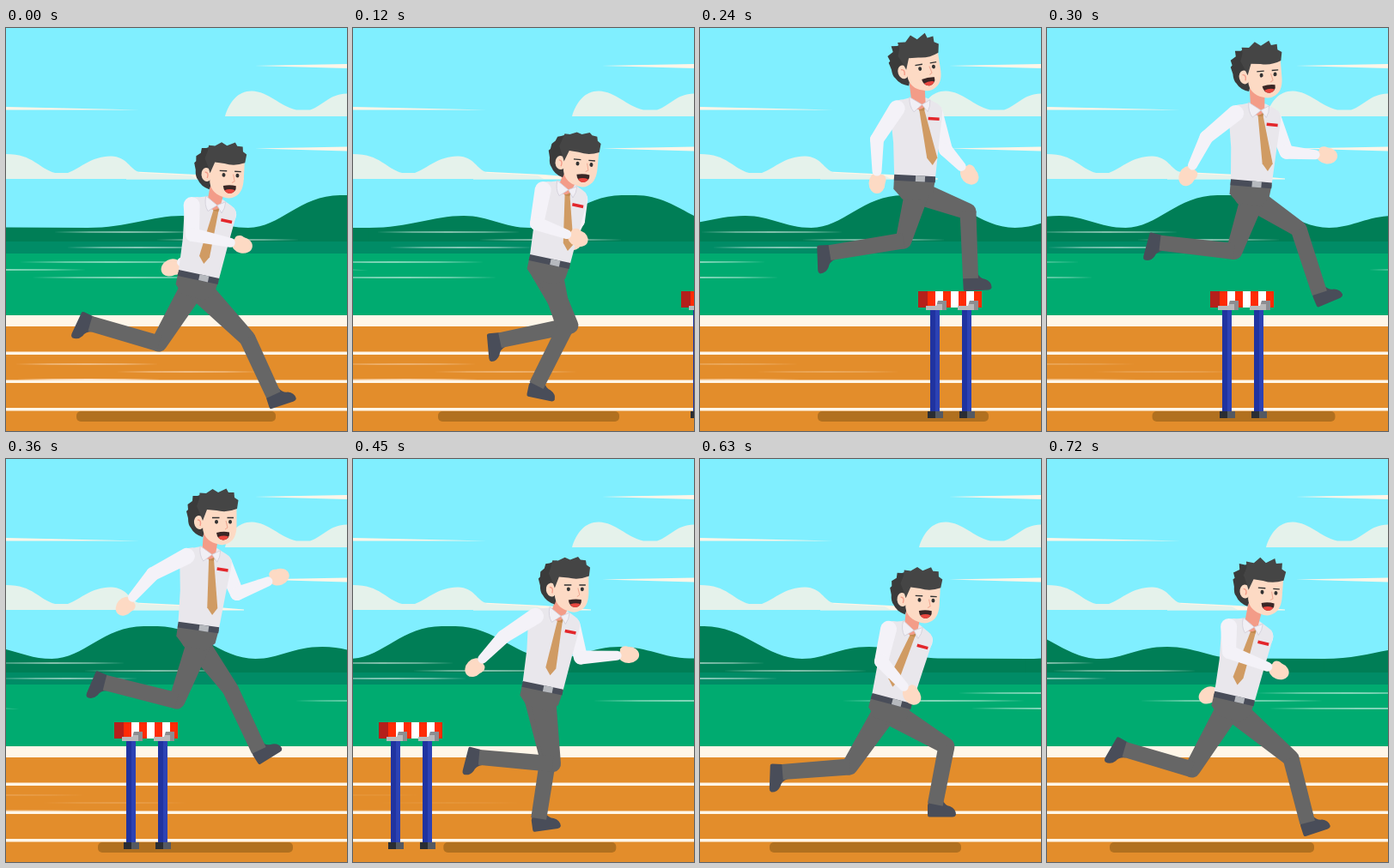
Write an HTML page with a canvas that moves like this. It is 397 by 470 pixels and loops after 0.75 s.

```html
<!DOCTYPE html>
<html lang="en">
<head>
<meta charset="utf-8">
<title>Hurdle run</title>
<style>
  html, body { margin: 0; width: 100%; height: 100%; overflow: hidden; background: #80efff; }
  canvas { display: block; width: 397px; height: 470px; }
</style>
</head>
<body>
<canvas id="stage" width="397" height="470"></canvas>
<script>
const ctx = document.getElementById('stage').getContext('2d');
const W = 397, LOOP = 750, STEP = 30, DEG = Math.PI / 180;
const CREAM = '#fff6e8', CLOUD = '#e5f2eb', SKIN = '#fddac4', PINK = '#f39c88';
const SHIRT = '#e9e7ec', SLEEVE = '#f4f2f8', PANTS = '#666666', SHOE = '#494d59';

// Pose times and tracks, one row per pose
const TIMES = [0, 120, 240, 360, 510, 630, 720];
// x, y, lean, tie sway
const BODY = [[224, 290, 12, 2], [229, 272, 12, 17], [250, 175, 3, 19], [224, 196, 8, 13],
  [220, 299, 13.5, 0], [223, 282, 15, -4], [218, 279, 13, -1]];
// x, y, tilt, hair lift
const HEAD = [[261.5, 171.5, 3, .4], [269.5, 158.5, 5, 0], [264, 46, -9, 1], [253, 73, 0, .5],
  [262.5, 186.5, 0, .1], [263.5, 164.5, 3, .5], [258.5, 155.5, 4, 1]];
// knee, ankle, toe angle
const LEG_A = [[281, 362, 311, 427, -18], [247, 350, 214, 416, 12], [237, 248, 152, 262, 88],
  [199, 282, 116, 261, 113], [261, 376, 177, 387, 92], [287, 335, 274, 402, 0], [284, 349, 303, 423, -18]];
const LEG_B = [[178, 368, 99, 345, 115], [253, 347, 172, 364, 85], [312, 214, 315, 291, -3],
  [261, 268, 294, 339, -32], [206, 382, 164, 431, 20], [174, 359, 97, 365, 92], [169, 362, 91, 339, 120]];
// elbow, hand
const ARM_NEAR = [[217, 241, 274, 253], [214, 228, 261, 245], [206, 130, 206, 180],
  [171, 134, 139, 171], [181, 243, 147, 278], [211, 236, 246, 275], [212, 225, 269, 247]];
const ARM_FAR = [[240, 255, 193, 279], [262, 225, 258, 246], [286, 142, 313, 171],
  [269, 157, 317, 138], [260, 266, 312, 287], [246, 250, 225, 268], [235, 250, 189, 275]];
// left, right
const SHADOW = [[82, 314], [99, 310], [137, 336], [107, 334], [104, 292], [81, 304], [73, 311]];

const HIP_A = [4, 14], HIP_B = [-4, 14], SHOULDER_NEAR = [-25, -80], SHOULDER_FAR = [19, -78];

// Point of a rotated frame [x, y, degrees]
function place([x, y, deg], [px, py]) {
  const c = Math.cos(deg * DEG), s = Math.sin(deg * DEG);
  return [x + px * c - py * s, y + px * s + py * c];
}

function bone(a, b) {
  let ang = Math.atan2(b[1] - a[1], b[0] - a[0]) / DEG;
  if (ang < -90) ang += 360;
  return [ang, Math.hypot(b[0] - a[0], b[1] - a[1])];
}

// Two-bone chains are interpolated as angles and lengths
const chain = (rows, root) => rows.map(([kx, ky, ex, ey, ...rest], i) =>
  [...bone(place(BODY[i], root), [kx, ky]), ...bone([kx, ky], [ex, ey]), ...rest]);
const legA = chain(LEG_A, HIP_A), legB = chain(LEG_B, HIP_B);
const armNear = chain(ARM_NEAR, SHOULDER_NEAR), armFar = chain(ARM_FAR, SHOULDER_FAR);

// Periodic monotone cubic interpolation
function sample(rows, t) {
  const n = TIMES.length;
  let i = n - 1;
  while (TIMES[i] > t) i--;
  const row = j => rows[(j + n) % n];
  const time = j => TIMES[(j + n) % n] + LOOP * Math.floor(j / n);
  const slope = (j, c) => (row(j + 1)[c] - row(j)[c]) / (time(j + 1) - time(j));
  const tangent = (j, c) => {
    const a = slope(j - 1, c), b = slope(j, c);
    return a * b <= 0 ? 0 : 2 * a * b / (a + b);
  };
  const h = time(i + 1) - time(i), u = (t - time(i)) / h, v = 1 - u;
  return row(i).map((p, c) =>
    p * (1 + 2 * u) * v * v + row(i + 1)[c] * (3 - 2 * u) * u * u +
    h * (tangent(i, c) * u * v * v - tangent(i + 1, c) * u * u * v));
}

function fill(color, d) {
  ctx.fillStyle = color;
  ctx.fill(new Path2D(d));
}

function line(color, width, d) {
  ctx.strokeStyle = color;
  ctx.lineWidth = width;
  ctx.stroke(new Path2D(d));
}

function rect(color, x, y, w, h) {
  ctx.fillStyle = color;
  ctx.fillRect(x, y, w, h);
}

function oval(color, x, y, rx, ry, rot = 0) {
  ctx.fillStyle = color;
  ctx.beginPath();
  ctx.ellipse(x, y, rx, ry, rot, 0, 7);
  ctx.fill();
}

function within([x, y, deg], draw) {
  ctx.save();
  ctx.translate(x, y);
  ctx.rotate(deg * DEG);
  draw();
  ctx.restore();
}

// Tapered limb segment with rounded ends
function limb(color, a, b, ra, rb) {
  const ang = Math.atan2(b[1] - a[1], b[0] - a[0]), q = Math.PI / 2;
  ctx.fillStyle = color;
  ctx.beginPath();
  ctx.arc(a[0], a[1], ra, ang + q, ang - q);
  ctx.arc(b[0], b[1], rb, ang - q, ang + q);
  ctx.fill();
}

function streak(x, y, len, color) {
  const m = x + len / 2;
  fill(color, `M${x} ${y}Q${m} ${y - 2} ${x + len} ${y}Q${m} ${y + 2} ${x} ${y}`);
}

function sky() {
  rect('#80efff', 0, 0, W, 260);
  fill(CREAM, 'M0 92L155 95.5L0 95.5ZM290 44L397 42V47ZM290 140.500L397 138.500V143.500Z');
  fill(CREAM, 'M140 167L222 171L277 175.500L277 176.500H140Z');
  fill(CLOUD, 'M255 103C260 86 270 73.500 286 73.500C306 74 318 91 338 95.500H354C370 90 376 77 397 76.500V103Z');
  fill(CLOUD, 'M0 147C32 147 38 164 57 169H72C88 163 98 150 122 149.500C142 150 143 165 157 169L215 172L222 176H0Z');
}

function field(t) {
  const shift = 0.635 * t, tile = 685;
  for (const k of [-1, 0, 1]) {
    ctx.save();
    ctx.translate(397 + k * tile - shift, 0);
    fill('#007e56', 'M-302 250V233C-255 233 -228 219 -192 219C-162 219 -146 233 -115 233' +
      'C-78 233 -55 195 -8 195H8C55 195 80 233 122 233C150 233 165 219 200 219' +
      'C232 219 250 232 280 232.500L384 233V250Z');
    ctx.restore();
  }
  rect('#008c66', 0, 249, W, 14);
  rect('#00ab70', 0, 263, W, 73);
  const pale = 'rgba(255,255,255,.5)';
  [[55, 238], [174, 247], [70, 256]].forEach(([x, y]) => streak(x - t * 7 / 30, y, 168, pale));
  [[15, 273], [-120, 282], [30, 291]].forEach(([x, y]) => {
    streak(x - shift, y, 214, pale);
    streak(x + tile - shift, y, 214, pale);
  });
}

function track(t) {
  rect('#e38d2b', 0, 340, W, 130);
  rect(CREAM, 0, 335, W, 13);
  [377.5, 410.5, 443].forEach(y => rect(CREAM, 0, y, W, 3.5));
  const slide = 0.31 * t - 0.0002 * t * t, fade = Math.max(0, 1 - t / 530);
  [[10, 392, .5], [128, 401, .5], [12, 410, .9]].forEach(([x, y, a]) =>
    streak(x - slide, y, 168, `rgba(255,235,215,${a * fade})`));
}

function hurdle(t) {
  ctx.save();
  ctx.translate(510 - t * 16 / 15, 0);
  for (const x of [14, 51]) {
    rect('#2033a0', x, 322, 6, 126);
    rect('#2c42b4', x + 6, 322, 5, 126);
    rect('#2a2d33', x - 3, 447, 9, 8);
    rect('#545962', x + 6, 447, 9, 8);
  }
  rect('#b5201b', 0, 307, 11, 19);
  for (let i = 0; i < 7; i++) rect(i % 2 ? '#ffffff' : '#ff2b06', 11 + i * 9, 307, 9, 19);
  for (const x of [9, 46]) {
    fill('#b9b9bb', `M${x} 324H${x + 12}L${x + 14} 318H${x + 24}V329H${x}Z`);
    fill('#8d8d91', `M${x + 14} 318H${x + 24}V329H${x + 19}V322H${x + 13}Z`);
  }
  ctx.restore();
}

function shadow(t) {
  const [l, r] = sample(SHADOW, t);
  ctx.fillStyle = '#b1701f';
  ctx.beginPath();
  ctx.roundRect(l, 447, r - l, 12, 5);
  ctx.fill();
}

function joints(body, root, [a1, l1, a2, l2]) {
  const top = place(body, root);
  const mid = place([...top, a1], [l1, 0]);
  return [top, mid, place([...mid, a2], [l2, 0])];
}

function leg(body, root, pose) {
  const [hip, knee, ankle] = joints(body, root, pose);
  within([...ankle, pose[4]], () =>
    fill(SHOE, 'M-9 13V2Q-8 -5 0 -6L8 -5Q11 2 17 3Q24 6 24 13Q23 15.500 20 15.500H-7Q-9 15.500 -9 13Z'));
  limb(PANTS, hip, knee, 14.5, 9.5);
  // trouser leg has a square hem
  const d = pose[2], len = pose[3];
  within([...knee, d], () => fill(PANTS, `M0 -9.500L${len + 1} -9V9L0 9.500Z`));
}

function arm(body, root, pose) {
  const [top, elbow, hand] = joints(body, root, pose);
  within([...hand, pose[2]], () => {
    oval(SKIN, 1, 0, 12, 9.5);
    oval(SKIN, -3, -6, 6, 4.5);
  });
  const wrist = place([...elbow, pose[2]], [Math.max(4, pose[3] - 13), 0]);
  limb(SLEEVE, top, elbow, 9.5, 8);
  limb(SLEEVE, elbow, wrist, 8, 5.5);
}

function torso(sway) {
  fill(PANTS, 'M-24 0H24L22 16L12 26L-14 24L-24 14Z');
  fill(SHIRT, 'M-24 -2L-27 -40L-33 -78Q-31 -90 -18 -91L-9 -94H9L20 -89Q29 -86 28 -75L26 -42L24 -2Z');
  rect(SHOE, -24, -3, 48, 7);
  rect('#b6b9be', 1, -3, 11, 7);
  const s = sway;
  fill('#d09b63', `M1 -80H7L${s + 6} -25L${s + 1} -16L${s - 6} -24Z`);
  fill('#c28a50', 'M0 -86L4 -89L8 -86L7 -79H1Z');
  rect('#e3262b', 12, -72, 13, 3.5);
}

function collar() {
  const d = 'M-11 -94L4 -86L-5 -77Q-11 -83 -11 -94ZM13 -92L4 -86L11 -78Q14 -84 13 -92Z';
  fill('#f1eff5', d);
  line('#d2cfd9', .8, d);
}

function head(k) {
  fill('#3b3b3b', `M-18 -14L-22 -33L-30 -30L${-34 - 3 * k} ${-29 - 2 * k}L-36 -24L${-40 - 3 * k} -20` +
    'L-41 -14L-43 -12Q-42 -8 -41 -4Q-41 4 -38 7Q-34 15 -24 18L-20 6Z');
  fill(SKIN, 'M-24 -17V6C-24 17 -17 23 -9 25.500Q0 29 6 25C14 21 15.500 12 15.500 4V-18Z');
  oval(SKIN, -28, 1, 6, 8, -.15);
  line(PINK, 1.4, 'M-30 -2Q-25 -2 -27 5');
  fill('#454545', 'M-24 -1L-27 -9L-31 -18L-28 -27' +
    `L${-26 - 3 * k} ${-33 - k}L-20 -33L${-12 - k} ${-36 - 4 * k}L-6 -34` +
    `L${3 + k} ${-37 - 3 * k}L6 -34L${12 + k} ${-33 - 2 * k}L13 -28L${17 + k} -25` +
    'L16 -15Q4 -10 -8 -13L-19 -14Z');
  line('#333333', 1.4, 'M-13 -4.500H-4.500M4.500 -4.500H12');
  oval('#333333', -8, .3, 2, 2.4);
  oval('#333333', 8, .3, 2, 2.4);
  line('#f0a791', 1, 'M3 -1L5 7L2 9');
  fill('#3a2726', 'M-8 13Q0 11 7 12.500Q8 20 0 21.500Q-7 21 -8 13Z');
  fill('#e8473f', 'M-6 18Q0 15.500 6 17.500Q4 21.500 0 21.500Q-4 21.500 -6 18Z');
}

function runner(t) {
  const body = sample(BODY, t), face = sample(HEAD, t);
  arm(body, SHOULDER_FAR, sample(armFar, t));
  leg(body, HIP_B, sample(legB, t));
  leg(body, HIP_A, sample(legA, t));
  within(body, () => torso(body[3]));
  limb(PINK, place(body, [0, -88]), place(face, [-14, 13]), 8, 9);
  within(body, collar);
  arm(body, SHOULDER_NEAR, sample(armNear, t));
  within(face, () => head(face[3]));
}

const start = performance.now();
function draw() {
  const t = Math.floor((performance.now() - start) % LOOP / STEP) * STEP;
  sky();
  field(t);
  track(t);
  shadow(t);
  hurdle(t);
  runner(t);
  requestAnimationFrame(draw);
}
draw();
</script>
</body>
</html>
```
